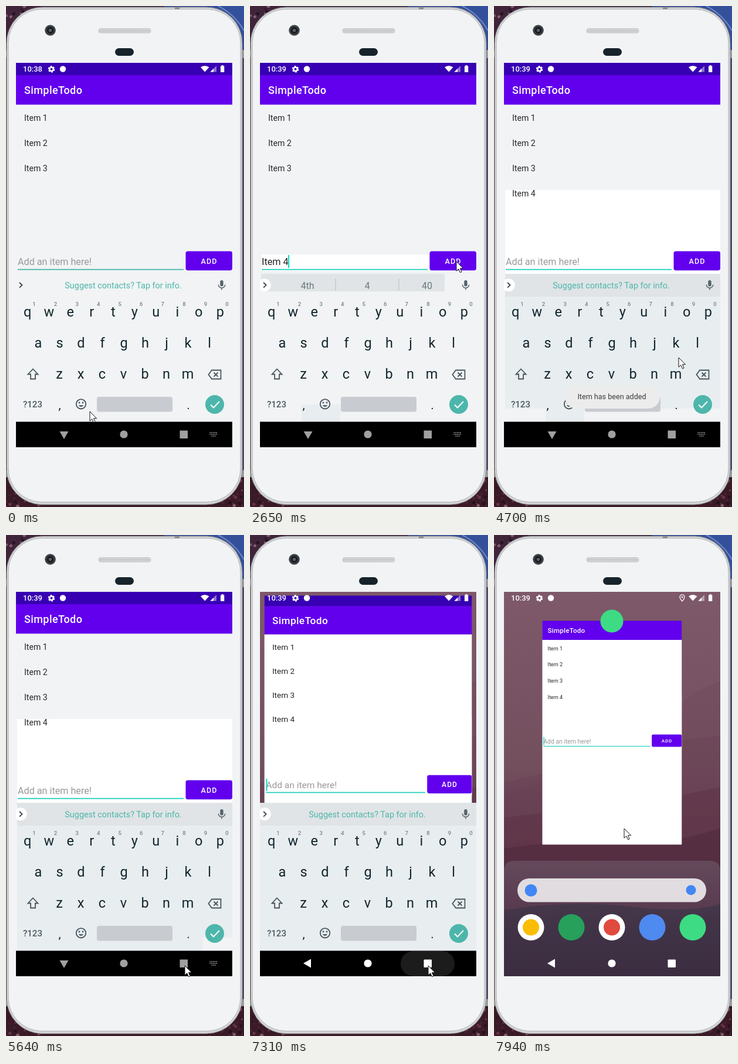
Animation of 406 by 855 pixels, one loop 8 s. Source, as an HTML page:

```html
<!DOCTYPE html>
<html lang="en">
<head>
<meta charset="utf-8">
<title>To-do app demo</title>
<style>
  html, body { margin: 0; width: 100%; height: 100%; overflow: hidden; background: #2a1a26; }
  svg { display: block; width: 100%; height: 100%; font-family: Roboto, sans-serif; }
  text { white-space: pre; }
  .mid { text-anchor: middle; }
  .bold { font-weight: 500; }
  .item { font-size: 14.1px; fill: #28282a; }
  .key { font-size: 23.5px; fill: #10252d; text-anchor: middle; }
  .digit { font-size: 9.5px; font-weight: 500; fill: #7a8185; text-anchor: middle; }
  .word { font-size: 16px; fill: #69787f; text-anchor: middle; }
  .icon { fill: none; stroke: #46555c; stroke-width: 1.8; }
</style>
</head>
<body>
<svg id="stage" viewBox="0 0 406 855"></svg>
<script>
const LOOP = 8000;
const PURPLE = '#6200ee', PALE = '#f1f3f4', KEYS = '#e8edf0', STRIP = '#e0e4e6', TEAL = '#4db6ab';

const rect = (x, y, w, h, fill, extra = '') =>
  `<rect x="${x}" y="${y}" width="${w}" height="${h}" fill="${fill}" ${extra}/>`;
const disc = (x, y, r, fill, extra = '') =>
  `<circle cx="${x}" cy="${y}" r="${r}" fill="${fill}" ${extra}/>`;
const path = (d, fill, extra = '') => `<path d="${d}" fill="${fill}" ${extra}/>`;
const text = (x, y, str, cls, extra = '') =>
  `<text x="${x}" y="${y}" class="${cls}" ${extra}>${str}</text>`;
const group = (id, body, extra = '') => `<g id="${id}" ${extra}>${body}</g>`;

let seed = 7;
const rnd = () => (seed = seed * 16807 % 2147483647) / 2147483647;

function desk() {
  let out = rect(0, 0, 406, 855, '#40243a') + rect(270, 0, 136, 75, '#34509a') +
    rect(0, 795, 406, 60, '#3a1a26') + rect(402, 75, 4, 720, '#4d4a6b');
  const tints = ['#1a1019', '#7b3f58', '#4a2336', '#a07a88'];
  for (let i = 0; i < 150; i++) {
    const zone = i % 3;
    out += disc((zone === 2 ? 342 : 0) + rnd() * 64, (zone ? 800 : 0) + rnd() * 55,
      .8 + rnd() * 2.4, tints[i % 4], 'opacity=".7"');
  }
  return out + path('M362 0Q390 14 406 42', 'none', 'stroke="#6f86c4" stroke-width="2"');
}

function phone() {
  let out = rect(0, 75, 4, 12, '#9b9ca0') + rect(401, 75, 5, 14, '#9b9ca0') +
    rect(0, 792, 4, 12, '#9b9ca0') + rect(401, 792, 5, 12, '#9b9ca0') +
    rect(1, 2, 402, 849, '#d3d4d6', 'rx="61" stroke="#85868a"') +
    rect(4, 5.5, 396, 841, PALE, 'rx="57" stroke="#b0b1b5"') +
    rect(288, 1.5, 8, 4, '#8b8c90') +
    disc(75.5, 41.5, 9.3, '#3d4145') + disc(75.5, 41.5, 6, '#1b1f23') +
    disc(75.5, 41.5, 2.6, '#59636b') +
    rect(158, 38.5, 89, 7.5, '#d6d7d9', 'rx="3.5" stroke="#b8b9bc" stroke-width=".8"') +
    rect(186, 72, 32, 13, '#17232a', 'rx="6.5"');
  return out + path('M160 42.2H245', 'none', 'stroke="#b2b3b6" stroke-width="3" stroke-dasharray="1 1.5"');
}

function home() {
  const icon = (x, plate, mark) =>
    disc(x, 669.5, 22.5, plate) + (mark ? disc(x, 669.5, 14, mark) : '');
  return rect(17, 97, 369, 656, 'url(#sky)') +
    path('M324 283Q350 262 386 250V753H17V440Q200 400 324 283Z', '#67404f', 'opacity=".18"') +
    path('M17 422L80 408L150 412L250 366L320 350L386 342V753H17Z', '#5f3b50', 'opacity=".25"') +
    path('M17 482Q120 470 200 462T386 430V753H17Z', '#5b2f42', 'opacity=".4"') +
    path('M17 535Q110 520 210 524T386 500V753H17Z', '#4f2a3e', 'opacity=".6"') +
    path('M17 640Q130 622 230 634T386 630V753H17Z', '#30263a', 'opacity=".75"') +
    path('M17 753V574Q17 556 35 556H368Q386 556 386 574V753Z', 'url(#dock)') +
    rect(40, 586, 322, 40.5, '#e0dce0', 'rx="20"') +
    disc(63, 606.5, 10.5, '#4285f4') + disc(336, 606, 8.5, '#4285f4') +
    icon(63, '#fff', '#fbbc04') + icon(132, '#27a05c') + icon(201, '#fff', '#e04a3f') +
    icon(270, '#4f8af0') + icon(339, '#3ddc84');
}

function app() {
  return rect(17, 97, 369, 21.5, '#3700b3') + rect(17, 118, 369, 50.6, PURPLE) +
    rect(17, 168.6, 369, 541.4, PALE) +
    group('fieldPatch', rect(19, 424, 285, 28, '#fff')) +
    group('listPatch', rect(19, 314, 367, 143, '#fff')) +
    group('fullPatch', rect(17, 168.6, 369, 541.4, '#fff')) +
    text(31, 150, 'SimpleTodo', 'bold', 'font-size="18" letter-spacing=".4" fill="#fff"') +
    [1, 2, 3, 4].map(n => text(31, 152.6 + 43 * n, 'Item ' + n, 'item', `id="item${n}"`)).join('') +
    text(20, 442, '', '', 'id="field" font-size="16.16"') +
    rect(20, 448.8, 283, 1.8, TEAL, 'id="underline"') +
    rect(20, 425, 2, 22, '#03dac5', 'id="caret"') +
    rect(306.5, 418.6, 79.5, 32.6, PURPLE, 'id="button" rx="3.6"') +
    text(346.5, 440, 'ADD', 'bold mid', 'font-size="12.6" letter-spacing="1.1" fill="#fff"');
}

function keyboard() {
  const row = (letters, x, y) =>
    [...letters].map((c, i) => text(x + 36.5 * i, y, c, 'key')).join('');
  const digits = [...'1234567890'].map((c, i) => text(48 + 36.55 * i, 512, c, 'digit')).join('');
  const words = [98, 200, 302].map((x, i) => text(x, 482.5, '', 'word', `id="word${i}"`)).join('');
  return rect(17, 457, 369, 253, PALE) +
    group('stripPatch', rect(19, 457, 313, 30, STRIP)) +
    group('commaPatch', rect(88, 680, 66, 30, KEYS)) +
    group('keysPatch', rect(19, 457, 367, 230, KEYS) + rect(19, 457, 367, 39, STRIP)) +
    group('footPatch', rect(19, 686, 316, 24, KEYS)) +
    group('keysFull', rect(17, 457, 369, 253, KEYS) + rect(17, 457, 369, 39, STRIP)) +
    group('bubble', path('M17 468.5A11 11 0 1 1 17 484Z', '#fff')) +
    path('M23 472L27.5 476.3L23 480.6', 'none', 'stroke="#37464d" stroke-width="1.8"') +
    group('words', words + rect(145.5, 465, 1, 21, '#b6c0c4') + rect(253.5, 465, 1, 21, '#b6c0c4')) +
    text(200, 482, 'Suggest contacts? Tap for info.', 'mid', `id="suggest" font-size="14.4" fill="${TEAL}"`) +
    rect(365.3, 468, 5.4, 10.5, '#55646b', 'rx="2.7"') +
    path('M362.3 475.5A5.7 5.7 0 0 0 373.7 475.5M368 481V484.5', 'none', 'stroke="#55646b" stroke-width="1.5"') +
    row('qwertyuiop', 36.8, 530) + digits + row('asdfghjkl', 55, 582.5) + row('zxcvbnm', 91, 636) +
    path('M46 619.5L54.5 628.5H50V636.5H42V628.5H37.5Z', 'none', 'class="icon"') +
    path('M351 621.5H366.5V636.5H351L345.5 629ZM354.5 625.5L361.5 632.5M361.5 625.5L354.5 632.5', 'none', 'class="icon"') +
    text(45.5, 685, '?123', 'bold mid', 'font-size="15" fill="#4c5a61"') +
    text(91.5, 688, ',', 'key', 'style="font-size:21px"') +
    disc(128, 679.3, 8.2, 'none', 'class="icon"') +
    disc(125, 677, 1.4, '#46555c') + disc(131, 677, 1.4, '#46555c') +
    path('M123.8 681.3A4.7 4.7 0 0 0 132.2 681.3Z', '#46555c') +
    rect(155, 667, 129, 25.5, '#c8cbd0', 'rx="3.5"') +
    text(311, 688, '.', 'key', 'style="font-size:21px"') +
    disc(356, 680, 16, TEAL) +
    path('M349 680.5L354 685.5L364 675', 'none', 'stroke="#fff" stroke-width="2"');
}

function nav() {
  const keys = [0, 1, 2].map(r =>
    path(`M${347.5 + (r === 2 ? 3 : 0)} ${728 + 3 * r}H${r === 2 ? 358 : 361}`, 'none',
      'stroke="#a0a0a0" stroke-width="1.7" stroke-dasharray="1.7 1"')).join('');
  return rect(17, 709.5, 369, 43.5, '#000', 'id="navBar"') +
    rect(257, 710, 92, 43, '#fff', 'id="ripple" rx="21.5"') +
    group('navDim', path('M91.5 726H106.5L99 739Z', '#a0a0a0') + disc(201, 731, 6.6, '#a0a0a0') +
      rect(296.5, 724.5, 13.5, 13.5, '#a0a0a0') + keys) +
    group('navLit', path('M104 723.5V738.5L91 731Z', '#fff') + disc(201, 731, 6.6, '#fff') +
      rect(296.5, 724.5, 13.5, 13.5, '#fff', 'rx="1"'));
}

function statusBar() {
  return text(29, 112, '', 'bold', 'id="clock" font-size="13" fill="#fff"') +
    disc(77.5, 107.8, 4.6, 'none', 'stroke="#fff" stroke-width="2.4" stroke-dasharray="2.8 2"') +
    disc(77.5, 107.8, 3.2, 'none', 'stroke="#fff" stroke-width="2.4"') +
    disc(97, 107.5, 5.2, '#fff') +
    path('M332 104.5Q339 99.5 346.5 104.5L339.2 112.5Z', '#fff') +
    path('M348.5 112.5L359 102V112.5Z', '#fff', 'opacity=".45"') +
    path('M348.5 112.5L354 107V112.5Z', '#fff') +
    path('M366 102.5H367.7V101H370.7V102.5H372.3V113H366Z', '#fff') +
    group('place', path('M321 113Q317 108.5 317 105.8A4 4 0 0 1 325 105.8Q325 108.5 321 113Z', 'none',
      'stroke="#fff" stroke-width="1.3"') + disc(321, 106, 1.4, '#fff'));
}

document.getElementById('stage').innerHTML = `<defs>
  <linearGradient id="sky" x2="0" y2="1"><stop stop-color="#7e596a"/><stop offset=".45" stop-color="#734f5e"/>
    <stop offset=".7" stop-color="#62384b"/><stop offset="1" stop-color="#3a2e44"/></linearGradient>
  <linearGradient id="dock" x2="0" y2="1"><stop stop-color="#8b8a98" stop-opacity=".3"/>
    <stop offset=".5" stop-color="#6b6a7c" stop-opacity=".2"/>
    <stop offset="1" stop-color="#4a4458" stop-opacity=".2"/></linearGradient>
  <clipPath id="screen"><rect x="17" y="97" width="369" height="656"/></clipPath>
  <clipPath id="cardClip"><rect id="cardBox" x="17" width="369"/></clipPath></defs>` +
  desk() + phone() +
  `<g clip-path="url(#screen)">` + group('home', home()) +
  group('card', `<g clip-path="url(#cardClip)">${app()}</g>`) +
  disc(201, 147, 19.5, '#3ddc84', 'id="badge"') +
  group('keyboard', keyboard()) + statusBar() + nav() +
  group('toast', rect(121, 647, 162, 40, '#ececec', 'rx="20"') +
    text(201, 671, 'Item has been added', 'mid', 'font-size="12.6" fill="#3c3c3c"')) + '</g>' +
  path('M0 0V16.2L3.8 12.8L6.5 18.8L9.1 17.7L6.5 11.8H11.6Z', '#fff', 'id="pointer" stroke="#111" stroke-width="1"');

const el = {};
document.querySelectorAll('#stage [id]').forEach(n => el[n.id] = n);

// Each track lists [start time, values...]; a value holds until the next entry.
const tracks = {
  typed: [[0, ''], [690, 'I'], [810, 'It'], [930, 'Ite'], [1050, 'Item'], [1480, 'Item '], [1630, 'Item 4'], [3230, '']],
  words: [[0, ''], [690, "I'm|I|I'll"], [810, "It's|It|Its"], [930, 'Items|Ite|Item'], [1050, 'Items|Item|item'],
    [1480, 'to|I|you'], [1630, '4th|4|40'], [3230, '']],
  caret: [[0, 0], [380, 1], [2110, 0], [2650, 1], [3080, 0], [3230, 1], [3740, 0], [4130, 1], [4700, 0],
    [5090, 1], [5640, 0], [6060, 1], [6650, 0], [7050, 1]],
  button: [[0, PURPLE], [3080, '#7b2cf0'], [3230, '#8540f2'], [3350, '#7320ef'], [3470, PURPLE]],
  toast: [[0, 0], [3350, .3], [3470, .72], [3590, 1], [5240, .65], [5370, .25], [5490, 0]],
  scale: [[0, 1], [7190, .99], [7310, .9593], [7430, .6667], [7550, .645]],
  keyboard: [[0, 0, 1], [7430, 39, .19], [7550, 60, 0]],
  ripple: [[0, 0], [7050, .11], [7430, .04], [7550, 0]],
  badge: [[0, 0], [7550, .4], [7670, .85], [7790, 1]],
  pointer: [[0, 143, 692], [1630, 147, 660], [1750, 188, 560], [1870, 235, 440], [1990, 275, 360], [2110, 305, 328],
    [2230, 327, 394], [2380, 341, 418], [2500, 352, 436], [3990, 350, 436], [4130, 343, 430], [4280, 325, 425],
    [4400, 304, 441], [4550, 303, 538], [4700, 315, 600], [4820, 322, 644], [4970, 318, 690], [5090, 310, 728],
    [5240, 305, 735], [7050, 304, 735], [7670, 300, 715], [7790, 286, 666], [7940, 222, 501]]
};
const at = (name, t) => tracks[name].findLast(step => step[0] <= t).slice(1);

// Parts visible only between two times.
const spans = {
  fieldPatch: [690], stripPatch: [690], bubble: [690], commaPatch: [1630], item4: [3230], listPatch: [3230],
  keysPatch: [3230], footPatch: [4970], fullPatch: [7190], keysFull: [7190], navDim: [0, 7050], navLit: [7050],
  navBar: [0, 7430], place: [7430], home: [7190]
};

const show = (node, on) => node.setAttribute('visibility', on ? 'visible' : 'hidden');
const fade = (name, t) => el[name].setAttribute('opacity', at(name, t)[0]);
const put = (node, str) => { if (node.textContent !== str) node.textContent = str; };

function draw(t) {
  for (const id in spans) {
    const [from, to = LOOP] = spans[id];
    show(el[id], t >= from && t < to);
  }
  const [typed] = at('typed', t), [words] = at('words', t), [scale] = at('scale', t);
  put(el.field, typed || 'Add an item here!');
  el.field.setAttribute('fill', typed ? '#202124' : '#999');
  show(el.caret, at('caret', t)[0]);
  el.caret.setAttribute('x', [20, 24.5, 30, 38.5, 52.5, 56, 65][typed.length]);
  el.underline.setAttribute('fill', t < 690 ? TEAL : '#1fcfbd');
  el.button.setAttribute('fill', at('button', t)[0]);

  show(el.suggest, !words);
  el.words.setAttribute('opacity', words ? 1 : 0);
  words.split('|').forEach((w, i) => put(el['word' + i], w));

  put(el.clock, t < 1200 ? '10:38' : '10:39');
  ['toast', 'ripple', 'badge'].forEach(name => fade(name, t));

  el.card.setAttribute('transform', `translate(201.2 198.5) scale(${scale}) translate(-201.2 -198.5)`);
  const top = t < 7190 ? 97 : t < 7430 ? 99.5 : 118;
  el.cardBox.setAttribute('y', top);
  el.cardBox.setAttribute('height', 710 - top);

  const [drop, alpha] = at('keyboard', t);
  el.keyboard.setAttribute('transform', `translate(0 ${drop})`);
  el.keyboard.setAttribute('opacity', alpha);
  el.pointer.setAttribute('transform', `translate(${at('pointer', t).join(' ')})`);
}

const start = performance.now();
function tick() {
  draw((performance.now() - start) % LOOP);
  requestAnimationFrame(tick);
}
tick();
</script>
</body>
</html>
```
